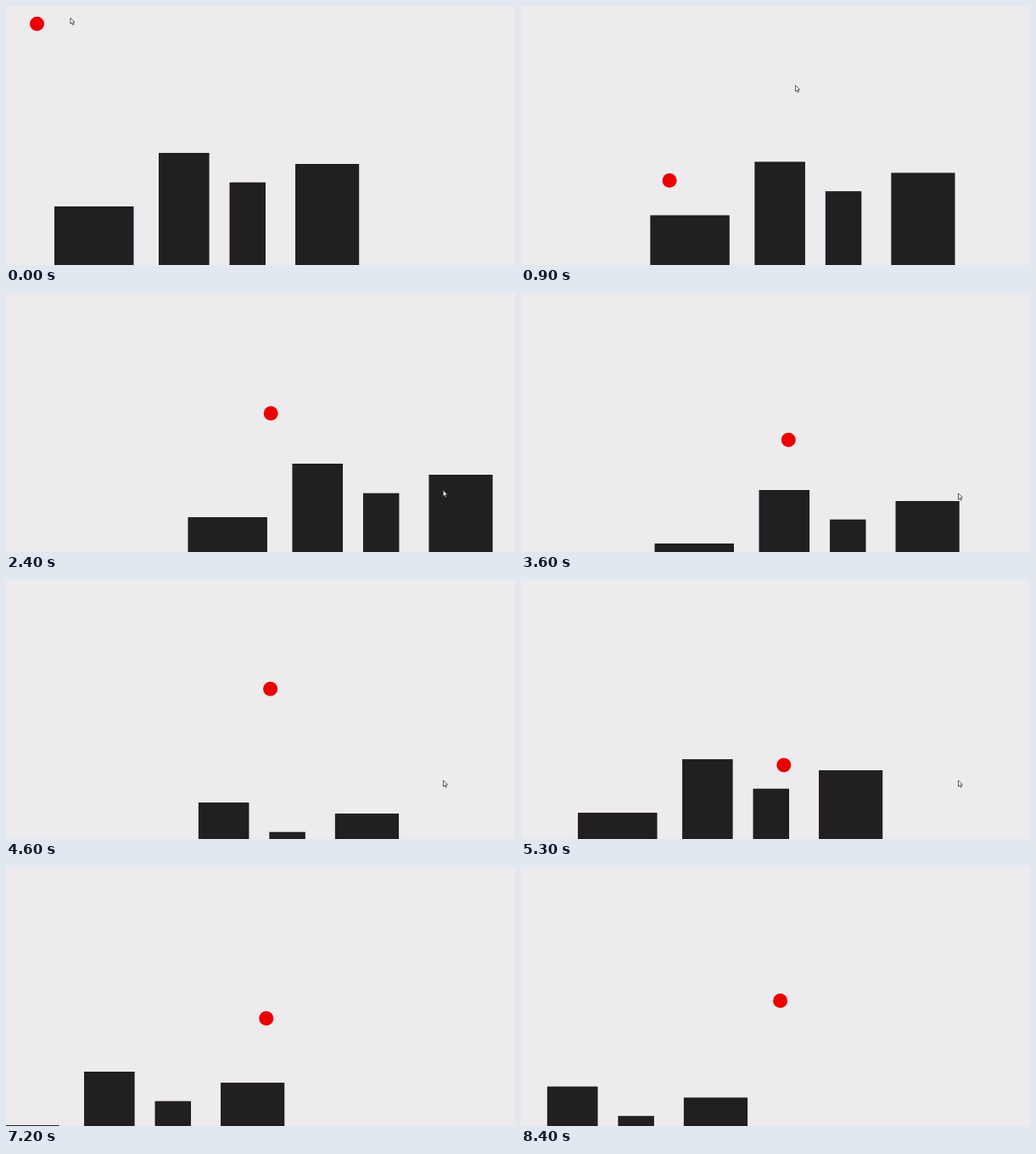
These frames come from a looping animation (600 by 305 pixels, 8500 ms). An HTML page with a canvas:

```html
<!DOCTYPE html>
<html lang="en">
<head>
<meta charset="utf-8">
<title>Bouncing ball with a following camera</title>
<style>
  html, body { margin: 0; width: 100%; height: 100%; overflow: hidden; background: #edebee; }
  canvas { display: block; width: 600px; height: 305px; }
</style>
</head>
<body>
<canvas id="stage" width="600" height="305"></canvas>
<script>
const ctx = document.getElementById('stage').getContext('2d');
const LOOP = 8500, STEP = 100, RADIUS = 8.5;

const buildings = [
  { x: 57, top: 236, width: 93.5 },
  { x: 180, top: 173, width: 59.6 },
  { x: 263.5, top: 207.7, width: 42.5 },
  { x: 341, top: 186, width: 75.2 }
];

// Each bounce: when, on which building, and how high the arc after it rises.
const bounces = [
  { at: -.98, on: 0, rise: 206.5 },
  { at: .98, on: 0, rise: 110 },
  { at: 1.95, on: 0, rise: 135.5 },
  { at: 3.83, on: 1, rise: 143 },
  { at: 5.35, on: 2, rise: 115 },
  { at: 6.65, on: 3, rise: 100 },
  { at: 7.35, on: 3, rise: 140.7 },
  { at: 8.75, on: 3, rise: 0 }
];

// Turning points of the camera's vertical sway: it trails the ball's arcs.
const sway = [
  [0, 0], [.6, 15.4], [1.3, 2.6], [2, 13], [3.2, 73], [4, 45], [4.75, 93.7],
  [5.5, 27], [6.1, 66.5], [6.7, 29], [7.15, 69], [7.45, 54], [8.05, 101], [8.75, 70]
];

const mix = (a, b, u) => a + (b - a) * u;
const easeInOut = u => (1 - Math.cos(Math.PI * u)) / 2;

const ballX = t => 36.5 + 50 * Math.max(0, t - .035);

function ballY(t) {
  const i = bounces.findIndex(bounce => bounce.at > t);
  const from = bounces[i - 1], to = bounces[i];
  const u = (t - from.at) / (to.at - from.at);
  const base = mix(buildings[from.on].top, buildings[to.on].top, u) - RADIUS;
  return base - from.rise * 4 * u * (1 - u);
}

// The camera eases towards the ball, with a pull that grows with time.
function cameraX(t) {
  const dt = 1 / 240;
  let x = 0;
  for (let i = 0; i < Math.round(t / dt); i++) {
    const now = (i + .5) * dt;
    x += .85 * (now + .23) * (298.8 - ballX(now) - x) * dt;
  }
  return x;
}

function cameraY(t) {
  const i = sway.findIndex(([at]) => at > t);
  const [start, a] = sway[i - 1], [end, b] = sway[i];
  return mix(a, b, easeInOut((t - start) / (end - start)));
}

function drawPointer(t) {
  const u = Math.min(t / 2.44, 1);
  ctx.save();
  ctx.translate(mix(515.5, 76, (1 - u) ** 1.8), mix(14, 236, u ** 1.03));
  const arrow = new Path2D('M0 0V7.2L1.7 5.7 2.8 8.2 4 7.7 2.9 5.2 5 5Z');
  ctx.fillStyle = '#fff';
  ctx.fill(arrow);
  ctx.lineWidth = .8;
  ctx.strokeStyle = '#333';
  ctx.stroke(arrow);
  ctx.restore();
}

function draw(t) {
  ctx.fillStyle = '#edebee';
  ctx.fillRect(0, 0, 600, 305);

  ctx.save();
  ctx.translate(cameraX(t), cameraY(t));
  ctx.fillStyle = '#221f22';
  for (const { x, top, width } of buildings) ctx.fillRect(x, top, width, 400);
  ctx.fillStyle = '#eb0000';
  ctx.beginPath();
  ctx.arc(ballX(t), ballY(t), RADIUS, 0, 2 * Math.PI);
  ctx.fill();
  ctx.restore();

  if (t < 6.8) drawPointer(t);
}

const start = performance.now();
function frame() {
  const ms = Math.max(0, performance.now() - start) % LOOP;
  draw(Math.floor(ms / STEP) * STEP / 1000);
  requestAnimationFrame(frame);
}
frame();
</script>
</body>
</html>
```
